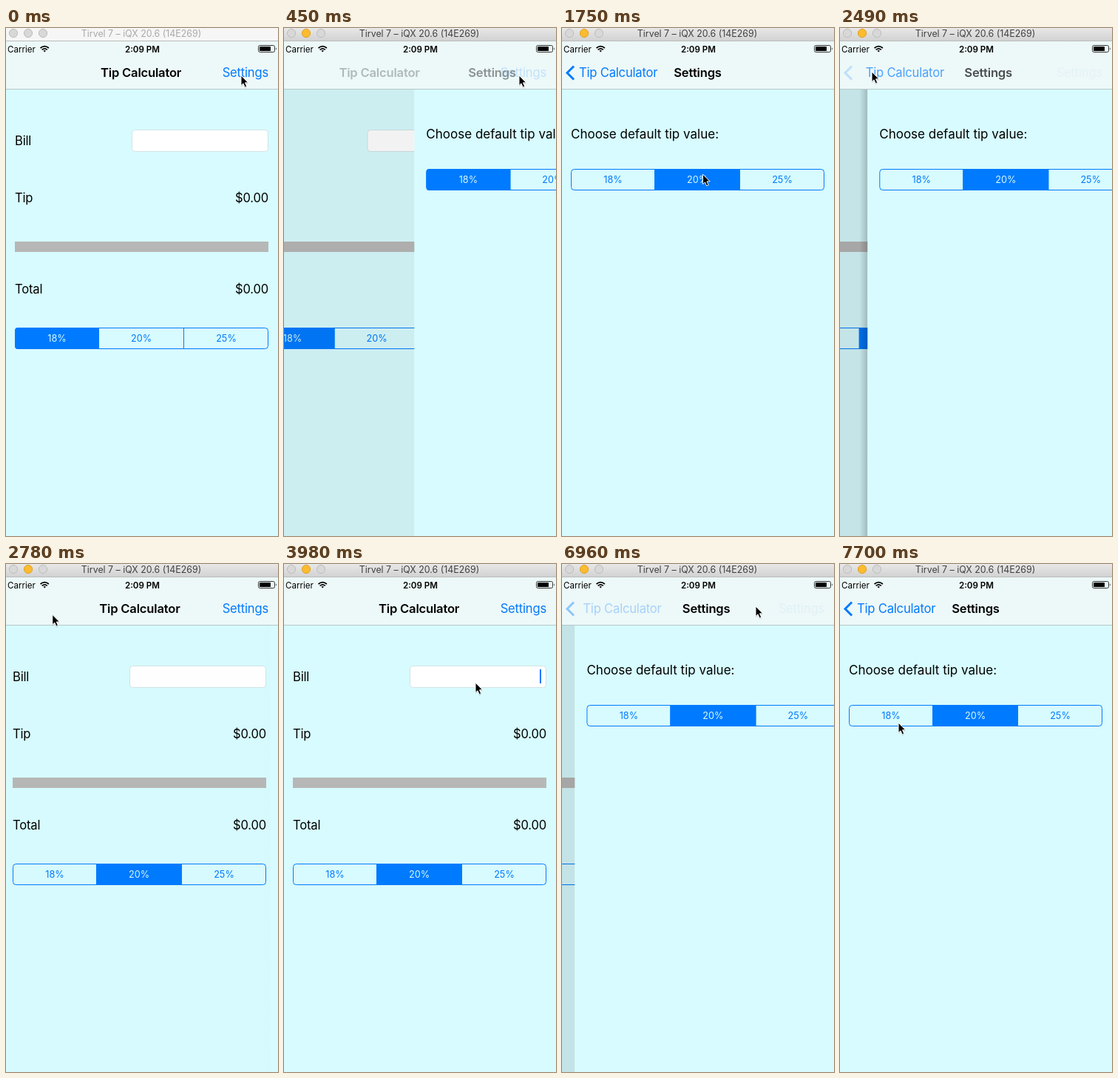
These frames come from a looping animation (368 by 685 pixels, 7.99 s). An HTML page:

```html
<!DOCTYPE html>
<html lang="en">
<head>
<meta charset="utf-8">
<title>Tip Calculator</title>
<style>
  html, body { margin: 0; width: 100%; height: 100%; overflow: hidden; background: #d7fbfe; }
  svg { display: block; font: 16.6px Inter, "Open Sans", sans-serif; letter-spacing: -.2px; }
  .end { text-anchor: end; }
  .mid { text-anchor: middle; }
  .bold { font-weight: 600; }
  .blue { fill: #007aff; }
  .line { fill: none; stroke: #007aff; }
  .seg { font-size: 12.7px; letter-spacing: 0; }
</style>
</head>
<body>
<svg width="368" height="685" viewBox="0 0 368 685">
  <defs>
    <linearGradient id="chrome" x2="0" y2="1">
      <stop stop-color="#e8e8e8"/><stop offset="1" stop-color="#d2d2d2"/>
    </linearGradient>
    <linearGradient id="shade">
      <stop stop-color="#000" stop-opacity="0"/><stop offset="1" stop-color="#000" stop-opacity=".2"/>
    </linearGradient>
    <clipPath id="round"><rect width="343" height="29" rx="4"/></clipPath>
  </defs>
  <rect width="368" height="685" fill="#d7fbfe"/>

  <g id="home">
    <text x="12" y="157.5">Bill</text>
    <rect x="170.5" y="137.5" width="184" height="29" rx="4" fill="#fff" stroke="#d3e3e5"/>
    <text id="bill" class="end" x="348.5" y="157" font-size="14" letter-spacing="0"></text>
    <rect id="caret" class="blue" x="346" y="142" width="2" height="19"/>
    <text x="12" y="234.5">Tip</text>
    <text id="tip" class="end" x="355" y="234.5"></text>
    <rect x="12" y="288" width="343" height="14" fill="#b7b7b7"/>
    <text x="12" y="357.5">Total</text>
    <text id="total" class="end" x="355" y="357.5"></text>
    <g id="homeSeg" transform="translate(12 404)"></g>
  </g>

  <rect id="dim" y="82" height="603"/>
  <rect id="shadow" y="82" width="11" height="603" fill="url(#shade)"/>
  <rect id="sheet" y="82" width="368" height="603" fill="#d7fbfe"/>
  <g id="prefs">
    <text x="12" y="149" font-size="17" letter-spacing="0">Choose default tip value:</text>
    <g id="prefSeg" transform="translate(12 190)"></g>
  </g>

  <rect y="17" width="368" height="65" fill="#edf8f8"/>
  <rect y="82" width="368" height="1" fill="#b4c8cb"/>
  <text id="homeTitle" class="bold" y="66">Tip Calculator</text>
  <text id="prefTitle" class="bold mid" y="66">Settings</text>
  <text id="action" class="blue end" x="355" y="66">Settings</text>
  <path id="chevron" class="line" d="M16 51.5 7 60.5 16 69.5" stroke-width="3"/>
  <text id="back" class="blue" y="66">Tip Calculator</text>

  <text x="2" y="32.5" font-size="11.6" letter-spacing="0">Carrier</text>
  <g fill="none" stroke="#000" stroke-width="1.7">
    <path d="M46.5 27q5.7-4.6 11.4 0M48.6 29.3q3.6-2.8 7.2 0"/>
    <path d="M50.4 30.6q1.8-1.2 3.6 0l-1.8 1.9z" fill="#000" stroke="none"/>
  </g>
  <text class="bold mid" x="184.5" y="32.5" font-size="11.6" letter-spacing="0">2:09 PM</text>
  <rect x="341.5" y="23.5" width="22" height="9" rx="2" fill="none" stroke="#333"/>
  <rect x="343" y="25" width="15" height="6" rx=".6"/>
  <path d="M365 26.2q1.6 1.8 0 3.6z"/>

  <rect id="bar" width="368" height="17"/>
  <rect y="17" width="368" height="1" fill="#bcbcbc"/>
  <g id="dots" stroke="#bdbdbd" fill="#d8d8d8">
    <circle cx="10" cy="7" r="5.6"/><circle id="amber" cx="30" cy="7" r="5.6"/><circle cx="50" cy="7" r="5.6"/>
  </g>
  <text id="window" class="mid" x="183" y="11.5" font-size="12.4" letter-spacing="0">Tirvel 7 – iQX 20.6 (14E269)</text>

  <g id="mouse">
    <path d="M0 1.5V15l3-2.7 2.2 4.9 2.6-1.1-2.2-4.9h4.3z" opacity=".2"/>
    <path d="M0 0V13.6l3-2.8 2.2 5 2.5-1.1-2.2-4.9h4.2z" stroke="#fff" stroke-width="1"/>
  </g>
</svg>
<script>
const LOOP = 7990, W = 368;
const $ = id => document.getElementById(id);
const set = (id, attrs) => { for (const k in attrs) $(id).setAttribute(k, attrs[k]); };
const clamp = v => Math.max(0, Math.min(1, v));
const shift = x => `translate(${x} 0)`;

// The screen refreshes in bursts: [first, last, count]
const bursts = [[300, 750, 4], [870, 1310, 4], [1610, 2490, 7], [2640, 2640, 1], [2780, 3530, 6],
  [3980, 3980, 1], [4420, 4720, 3], [5020, 5170, 2], [5620, 6370, 6], [6660, 6660, 1], [6960, 7700, 6]];
const ticks = [0];
for (const [a, b, n] of bursts)
  for (let i = 0; i < n; i++) ticks.push(n > 1 ? a + (b - a) * i / (n - 1) : a);

// Pointer moves: [start, end, x, y]
const moves = [[750, 1200, 200, 206], [1480, 2350, 43, 59], [2640, 3390, 259, 160],
  [5620, 6370, 262, 57], [6990, 7690, 79, 214]];

function pointer(t) {
  let x = 318, y = 64;
  for (const [a, b, tx, ty] of moves) {
    const p = clamp((t - a) / (b - a)), e = p * p * (3 - 2 * p);
    x += (tx - x) * e;
    y += (ty - y) * e;
  }
  return [x, y];
}

// Remaining part of a critically damped spring after u ms
const spring = u => u <= 0 ? 1 : (1 + .019 * u) * Math.exp(-.019 * u);

function segments(id, sel) {
  const cuts = [0, 113.5, 228.5, 343];
  const fill = `<rect class="blue" clip-path="url(#round)" x="${cuts[sel] - .5}" width="${cuts[sel + 1] - cuts[sel] + 1}" height="29"/>`;
  const labels = [18, 20, 25].map((v, i) =>
    `<text class="seg mid" x="${[57, 171, 286][i]}" y="19" fill="${i === sel ? '#d7fbfe' : '#007aff'}">${v}%</text>`);
  $(id).innerHTML = fill + '<rect class="line" x=".5" y=".5" width="342" height="28" rx="4"/>' +
    '<path class="line" d="M113.5 0V29M228.5 0V29"/>' + labels.join('');
}

function navigation(t) {
  const popping = t >= 2460 && t < 6720;
  const u = t - (popping ? 2460 : t < 2460 ? 360 : 6720);
  const rest = spring(u);
  const q = popping ? 1 - rest : rest;      // 1 = home, 0 = settings
  const x = q * W < .5 ? 0 : q > .995 ? W + 4 : q * W;
  const edge = Math.max(0, x - 4);
  const pressed = t >= 300 && t < 2460 || t >= 6660;

  set('home', { transform: shift(-.3 * (W - edge)) });
  set('dim', { width: edge, opacity: .1 * (1 - edge / W) });
  set('shadow', { x: edge - 11, opacity: popping && edge < W ? 1 - edge / W : 0 });
  set('sheet', { x: edge });
  set('prefs', { transform: shift(x) });

  let back, chevron, title, home, action;
  if (popping) {
    back = title = 1 - u / 95;
    chevron = .28 - u / 350;
    home = (u - 60) / 200;
    action = (u - 20) / 300;
  } else {
    back = (u - 195) / 150;
    chevron = (u - 180) / 150;
    title = u / 220;
    home = 1 - u / 120;
    action = (pressed ? .25 : 1) * clamp(1 - u / 300);
  }
  set('back', { x: 23 + (popping ? 104 : 92) * q, opacity: clamp(back) });
  set('chevron', { opacity: clamp(chevron) });
  set('prefTitle', { x: 183.5 + (popping ? 153 : 200) * q, opacity: clamp(title) });
  set('homeTitle', { x: 128 - 105 * (1 - q), opacity: clamp(home) });
  set('action', { opacity: clamp(action) });
}

function draw(t) {
  const active = t >= 300, sel = t >= 1300 ? 1 : 0;
  set('bar', { fill: active ? 'url(#chrome)' : '#f6f6f6' });
  set('amber', active ? { fill: '#fdbc2f', stroke: '#e0a028' } : { fill: '#d8d8d8', stroke: '#bdbdbd' });
  set('window', { fill: active ? '#404040' : '#a9a9a9' });
  segments('homeSeg', sel);
  segments('prefSeg', sel);
  navigation(t);

  const bill = t < 4550 ? '' : '100'.slice(0, t < 5000 ? 1 : t < 5150 ? 2 : 3);
  $('bill').textContent = bill;
  $('tip').textContent = '$' + (bill * .2).toFixed(2);
  $('total').textContent = '$' + (bill * 1.2).toFixed(2);
  const blink = [[3370, 3500], [3970, 4400], [4550, 4700], [5610, 6650]];
  set('caret', { opacity: blink.some(([a, b]) => t >= a && t < b) ? 1 : 0 });
  set('mouse', { transform: `translate(${pointer(t)})` });
}

let shown = -1;
function frame(now) {
  const t = now % LOOP;
  const tick = ticks.filter(v => v <= t + 1).pop();
  if (tick !== shown) draw(shown = tick);
  requestAnimationFrame(frame);
}
draw(shown = 0);
requestAnimationFrame(frame);
</script>
</body>
</html>
```
